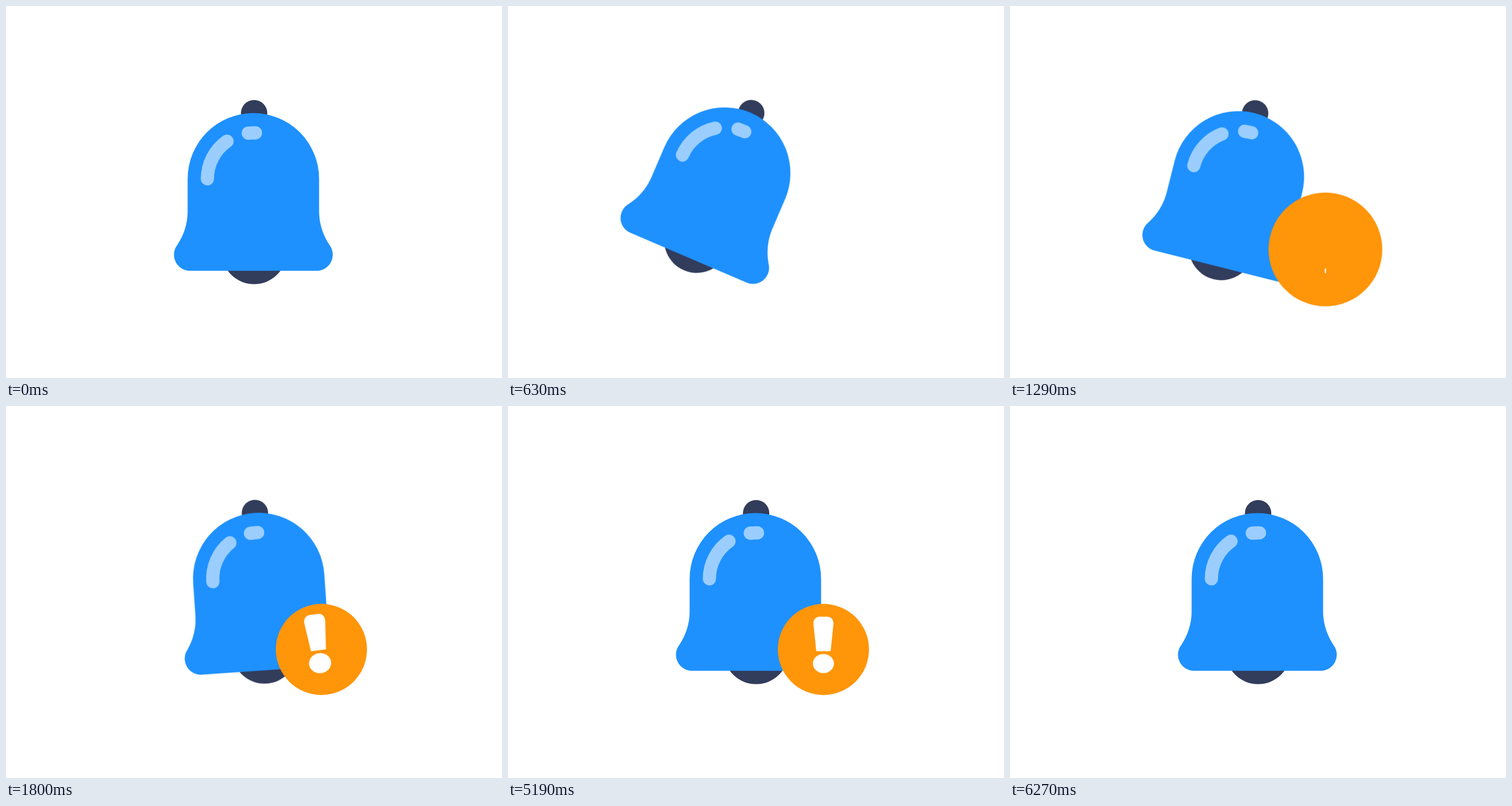
An HTML page for the animation above (6300 ms loop, 864 by 648 pixels).

```html
<!DOCTYPE html>
<html lang="en">
<head>
<meta charset="utf-8">
<title>Bell alert</title>
<style>
  html, body { margin: 0; width: 100%; height: 100%; overflow: hidden; background: #fff; }
  svg { display: block; width: 100%; height: 100%; }

  .bell, .badge, .mark, .tilt {
    transform-box: view-box;
    animation: 6300ms cubic-bezier(.37, 0, .63, 1) infinite;
  }
  .bell  { transform-origin: 428.3px 166px;   animation-name: ring; }
  .badge { transform-origin: 549.4px 424px;   animation-name: badge; }
  .mark  { transform-origin: 549.4px 465.2px; animation-name: mark; }
  .tilt  { transform-origin: 549.4px 465.2px; animation-name: tilt; }

  .metal { fill: #323c5b; }
  .body  { fill: #1e91ff; }
  .shine { fill: none; stroke: #9bceff; stroke-width: 23; stroke-linecap: round; }

  @keyframes ring {
    0%         { transform: rotate(0deg); }
    10%        { transform: rotate(23.2deg); }
    15.71%     { transform: rotate(-20.3deg); }
    21.03%     { transform: rotate(15deg); }
    26.03%     { transform: rotate(-9deg); }
    30.79%, to { transform: rotate(0deg); }
  }
  @keyframes badge {
    0%, 15.71%     { transform: scale(0); }
    20.63%         { transform: scale(1.25); }
    26.35%, 88.95% { transform: scale(1); }
    94.67%         { transform: scale(1.25); }
    99.52%, to     { transform: scale(0); }
  }
  @keyframes mark {
    0%, 19.68%    { transform: scale(0); }
    24.68%        { transform: scale(1.25); }
    30.4%, 81.9%  { transform: scale(1); }
    87.62%        { transform: scale(1.25); }
    92.54%, to    { transform: scale(0); }
  }
  @keyframes tilt {
    0%, 19.68% { transform: rotate(0deg); }
    23.81%     { transform: rotate(8deg); }
    28.25%     { transform: rotate(-7.6deg); }
    32.38%     { transform: rotate(4deg); }
    36.9%, to  { transform: rotate(0deg); }
  }
</style>
</head>
<body>
<svg viewBox="0 0 864 648">
  <g class="bell">
    <circle class="metal" cx="432.2" cy="186.7" r="23"/>
    <circle class="metal" cx="432.2" cy="427.6" r="56.9"/>
    <path class="body" d="M316.4 301a114.5 114.5 0 0 1 229 0V358
      C545.4 379 552 399 563.6 416.5A28 28 0 0 1 540.7 461.3H321
      A28 28 0 0 1 298.2 416.5C310 399 316.4 379 316.4 358Z"/>
    <path class="shine" d="M350.8 301A80 80 0 0 1 385 235.5M422 221.5A80 80 0 0 1 434.6 221.1"/>
  </g>
  <circle class="badge" cx="549.4" cy="424" r="79.4" fill="#ff9508"/>
  <g class="tilt">
    <g class="mark" fill="#fff">
      <path d="M537 427.3L532.2 381.5C531.2 373 536 367.6 543 367.6H556
        C563 367.6 567.7 373 566.7 381.5L561.9 427.3Z"/>
      <ellipse cx="549.4" cy="448.7" rx="18.3" ry="16.5"/>
    </g>
  </g>
</svg>
</body>
</html>
```
